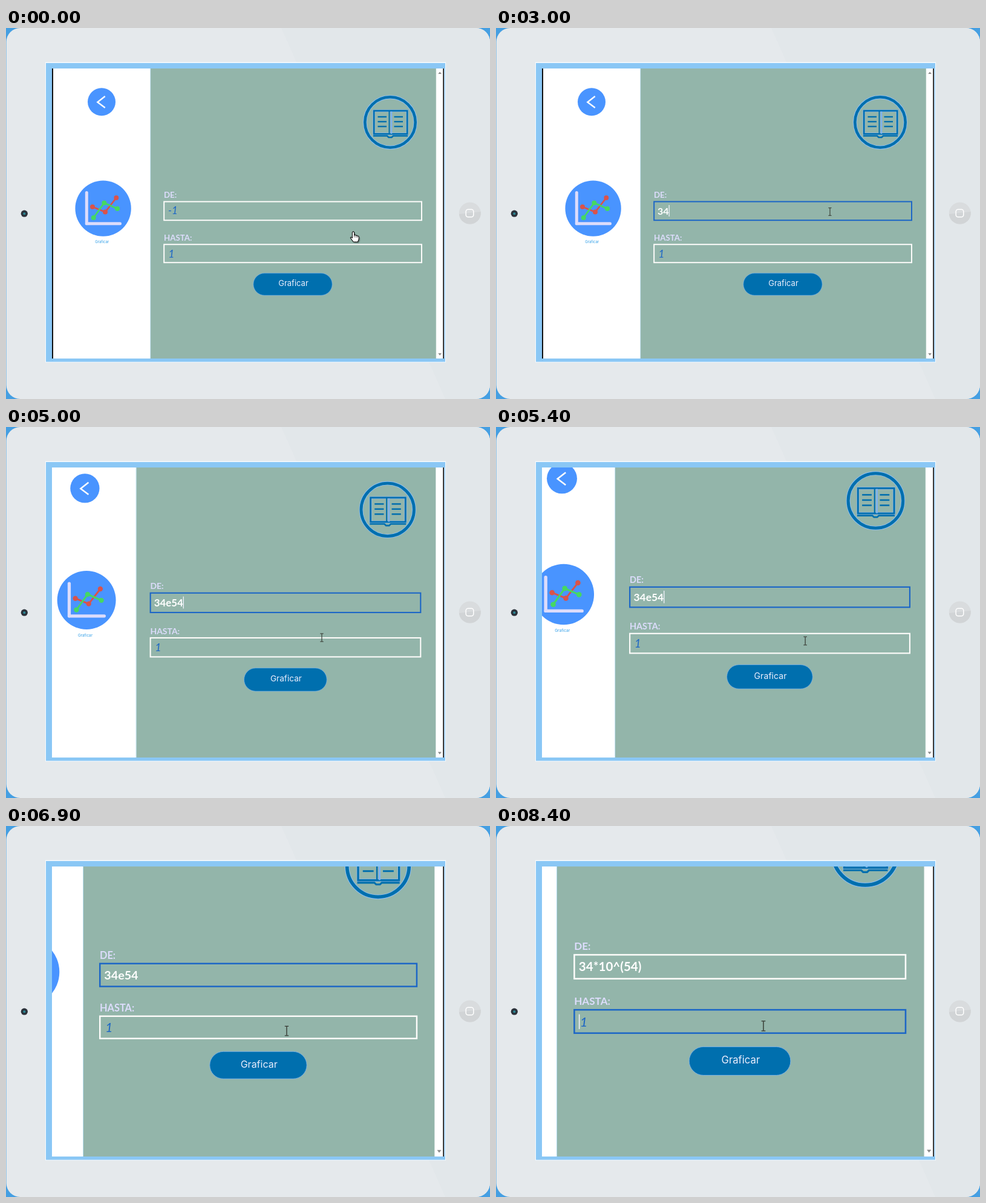
An HTML page with a canvas that plays this animation: 800x614 px, repeating every 8500 ms.

```html
<!DOCTYPE html>
<html lang="es">
<head>
<meta charset="utf-8">
<title>Graficar</title>
<style>
html, body { margin: 0; width: 100%; height: 100%; overflow: hidden; background: #459fe2; }
canvas { display: block; width: 800px; height: 614px; }
</style>
</head>
<body>
<canvas id="stage" width="800" height="614"></canvas>
<script>
const c = document.getElementById('stage').getContext('2d');
const LOOP = 8500, STEP = 100;
const BLUE = '#006fae', SKY = '#4994ff', LILAC = '#dcdcfb', GREEN = '#93b5aa', FOCUS = '#1c66c6';
const PIVOT = [722, 547];
const LATO = 'Lato, sans-serif', ROUND = 'Inter, sans-serif', UI = '"Open Sans", sans-serif';

// time, zoom
const ZOOM = [[4700, 1], [4800, 1.03], [5400, 1.0869], [6100, 1.1526], [6900, 1.23], [7500, 1.286]];
// time, x, y of the pointer on the page
const POINTER = [
  [0, 574, 337], [200, 574, 337], [900, 563.5, 314], [1000, 561, 312], [1100, 561, 312],
  [1400, 552, 304], [3600, 552, 304], [3900, 551, 305], [4300, 538, 327], [4700, 535, 335],
  [4800, 533, 352], [5400, 528, 369.4], [6100, 521.6, 377.8], [6900, 512.2, 378], [7500, 504.3, 379]
];
const KEYS = [[2500, '3'], [2700, '34'], [3100, '34e'], [3400, '34e5'], [3600, '34e54'], [7400, '34*10^(54)']];
const HINTS = ['-3.141592653589793', '-3141592653589793', '-3', '-10', '-10000000000',
  '-2109876543210987654321.1234567890123456789012'];
const CLICK_FROM = 1400, CLICK_TO = 7400;

function track(keys, t, i = 1) {
  if (t <= keys[0][0]) return keys[0][i];
  for (let k = 1; k < keys.length; k++) {
    const a = keys[k - 1], b = keys[k];
    if (t <= b[0]) return a[i] + (b[i] - a[i]) * (t - a[0]) / (b[0] - a[0]);
  }
  return keys[keys.length - 1][i];
}

function box(x, y, w, h, fill) {
  c.fillStyle = fill;
  c.fillRect(x, y, w, h);
}

function disc(x, y, r, fill) {
  c.beginPath();
  c.arc(x, y, r, 0, 7);
  c.fillStyle = fill;
  c.fill();
}

function ring(x, y, r, color, width) {
  c.beginPath();
  c.arc(x, y, r, 0, 7);
  c.strokeStyle = color;
  c.lineWidth = width;
  c.stroke();
}

function poly(points, color, width) {
  c.beginPath();
  points.forEach(p => c.lineTo(...p));
  c.strokeStyle = color;
  c.lineWidth = width;
  c.stroke();
}

function shape(points, fill) {
  c.beginPath();
  points.forEach(p => c.lineTo(...p));
  c.fillStyle = fill;
  c.fill();
}

function pill(x, y, w, h, r) {
  c.beginPath();
  c.roundRect(x, y, w, h, r);
}

function text(s, x, y, font, color, align = 'left') {
  c.font = font;
  c.fillStyle = color;
  c.textAlign = align;
  c.fillText(s, x, y);
}

function tablet() {
  box(0, 0, 800, 614, '#459fe2');
  c.save();
  pill(0.5, 0, 799.5, 614, 23);
  c.clip();
  box(0, 0, 800, 614, '#e5e9ec');
  shape([[455, 0], [800, 0], [800, 614], [726, 614]], '#e2e7ea');
  c.restore();

  disc(30.3, 307.2, 5.6, '#2b323b');
  disc(30.3, 307.2, 2, '#2b8795');

  c.save();
  c.beginPath();
  c.arc(766.8, 306.5, 18, 0, 7);
  c.clip();
  box(748, 288, 38, 38, '#d9dcde');
  shape([[748, 308], [786, 304], [786, 326], [748, 326]], '#d1d4d6');
  c.restore();
  pill(760.2, 300.2, 12.6, 12.6, 3.5);
  c.strokeStyle = '#fff';
  c.lineWidth = 1.5;
  c.stroke();

  box(65, 56.5, 662, 497, '#f6fbff');
  box(66, 58, 660, 494.5, '#8ac7f5');
}

function sidebar() {
  box(76, 60, 163, 500, '#fff');
  box(76, 60, 2, 500, '#111');
  disc(158, 122.2, 23, SKY);
  poly([[163.7, 113], [151.3, 122.7], [163.7, 132]], '#fff', 2.4);

  disc(160.6, 298.6, 46.2, SKY);
  c.lineCap = 'round';
  poly([[133.3, 272.5], [133.3, 323.8]], LILAC, 5);
  poly([[133.3, 323.8], [188.5, 323.8]], LILAC, 5);
  const series = [
    ['#d9534b', [[143, 296], [164, 304.5], [182.3, 281]]],
    ['#45d862', [[144.7, 314], [162.3, 289.5], [184, 299]]]
  ];
  for (const [color, points] of series) {
    poly(points, color, 2.8);
    points.forEach(p => disc(...p, 4, color));
  }
  c.lineCap = 'butt';
  text('Graficar', 158.6, 356, '6px ' + ROUND, '#2f9ee8', 'center');
}

function book() {
  ring(635, 156, 41.7, '#8fc0f3', 6.2);
  ring(635, 156, 41.7, BLUE, 4.6);
  c.strokeStyle = '#8fb8ea';
  c.lineWidth = 4;
  c.strokeRect(608.2, 137, 55, 38.3);
  c.strokeStyle = BLUE;
  c.lineWidth = 2.7;
  c.strokeRect(608.2, 137, 55, 38.3);
  poly([[633.5, 138], [633.5, 175]], BLUE, 2);
  poly([[637, 138], [637, 175]], '#7fb2ee', 2.6);
  for (const y of [147, 155, 163]) {
    poly([[614.5, y], [629, y]], BLUE, 2.4);
    poly([[641.5, y], [656, y]], BLUE, 2.4);
  }
  poly([[607, 178.6], [630, 178.6], [632.5, 181], [637.5, 181], [640, 178.6], [664, 178.6]], BLUE, 2.5);
}

function field(label, y, h, focused) {
  text(label, 261, y - 6, 'bold 13.3px ' + LATO, LILAC);
  c.strokeStyle = focused ? FOCUS : '#fdfcfa';
  c.lineWidth = 2;
  c.strokeRect(261.2, y, 425.8, h);
}

function caret(x, y) {
  box(x, y, 1.2, 19, '#f4f4ff');
}

function form(t) {
  const onFrom = t >= CLICK_FROM && t < CLICK_TO, onTo = t >= CLICK_TO;
  const key = KEYS.filter(k => t >= k[0]).pop();
  const typed = key ? key[1] : '';

  field('DE:', 287.4, 30.8, onFrom);
  if (typed) text(typed, 267, 308.6, 'bold 16px ' + LATO, '#fff');
  else text('-1', 268, 308.4, 'italic 17px ' + LATO, FOCUS);

  field('HASTA:', 358.2, 30, onTo);
  text('1', 268.5, 379.6, 'italic 17px ' + LATO, FOCUS);

  pill(408.8, 405.8, 130.4, 36.6, 18.3);
  c.fillStyle = BLUE;
  c.fill();
  c.strokeStyle = '#79b3ea';
  c.lineWidth = 0.7;
  c.stroke();
  text('Graficar', 475, 427.3, '13px ' + ROUND, '#eceefd', 'center');

  if (onFrom) {
    const start = t < 3600 ? 1500 : t < 4800 ? 3600 : 5000;
    const lit = t > 2400 && t < 3600 || (t - start + 1000) % 1000 < 500;
    c.font = 'bold 16px ' + LATO;
    if (lit) caret(267 + c.measureText(typed).width, 293);
  }
  if (onTo && (t - CLICK_TO) % 1000 < 500) caret(267, 364);

  if (t >= CLICK_FROM && t < 2500) {
    box(260, 319, 428, 113.5, '#c9c9c9');
    box(260.7, 319.5, 426.6, 112.3, '#fff');
    HINTS.forEach((s, i) => text(s, 263.2, 331.8 + i * 18.7, '8.8px ' + UI, '#222'));
  }
}

function scrollbar() {
  box(711, 60, 14, 500, '#fff');
  box(710.7, 60, 0.6, 500, '#dfe8e4');
  shape([[714.3, 76], [720, 76], [717.1, 72.4]], '#8b8b8b');
  shape([[714.3, 538.3], [720, 538.3], [717.1, 542]], '#8b8b8b');
}

function hand(x, y) {
  c.save();
  c.translate(x, y);
  c.beginPath();
  c.moveTo(-1.6, 1.2);
  c.quadraticCurveTo(0, -1.4, 1.6, 1.2);
  c.lineTo(1.7, 6);
  c.quadraticCurveTo(3.2, 4.6, 4.6, 6.6);
  c.quadraticCurveTo(6.2, 5.4, 7.2, 7.4);
  c.quadraticCurveTo(9, 6.6, 9.4, 9);
  c.lineTo(9.1, 13);
  c.lineTo(7.4, 17);
  c.lineTo(0.2, 17);
  c.lineTo(-4.7, 10.3);
  c.quadraticCurveTo(-4.4, 8, -1.6, 10.4);
  c.closePath();
  c.shadowColor = 'rgba(0,0,0,.45)';
  c.shadowBlur = 2;
  c.shadowOffsetX = c.shadowOffsetY = 1.5;
  c.fillStyle = '#fff';
  c.fill();
  c.shadowColor = 'transparent';
  c.strokeStyle = '#111';
  c.lineWidth = 1.1;
  c.stroke();
  poly([[1.7, 6], [1.7, 9.5]], '#222', 0.8);
  poly([[4.6, 6.8], [4.6, 9.8]], '#222', 0.8);
  poly([[7.2, 7.6], [7.2, 10]], '#222', 0.8);
  c.restore();
}

function beam(x, y) {
  const color = '#33362f';
  poly([[x, y - 6], [x, y + 6]], color, 1.1);
  for (const dy of [-6.3, 6.3]) poly([[x - 2.6, y + dy], [x + 2.6, y + dy]], color, 1);
}

function pointer(t) {
  const x = track(POINTER, t, 1), y = track(POINTER, t, 2);
  const overField = y < 319 || y > 351;
  (overField ? beam : hand)(x, y);
}

function draw(t) {
  tablet();
  c.save();
  c.beginPath();
  c.rect(76, 67, 649, 480);
  c.clip();
  c.save();
  const s = track(ZOOM, t);
  c.translate(...PIVOT);
  c.scale(s, s);
  c.translate(-PIVOT[0], -PIVOT[1]);
  box(238.3, 60, 473, 500, GREEN);
  sidebar();
  box(238.3, 60, 0.8, 500, '#b5dcef');
  book();
  form(t);
  scrollbar();
  pointer(t);
  c.restore();
  box(722.3, 67, 1.7, 480, '#111');
  box(724, 67, 1, 480, '#dceffd');
  c.restore();
}

const begin = performance.now();
function tick() {
  const t = (performance.now() - begin) % LOOP;
  draw(Math.floor(t / STEP) * STEP);
  requestAnimationFrame(tick);
}
tick();
</script>
</body>
</html>
```
